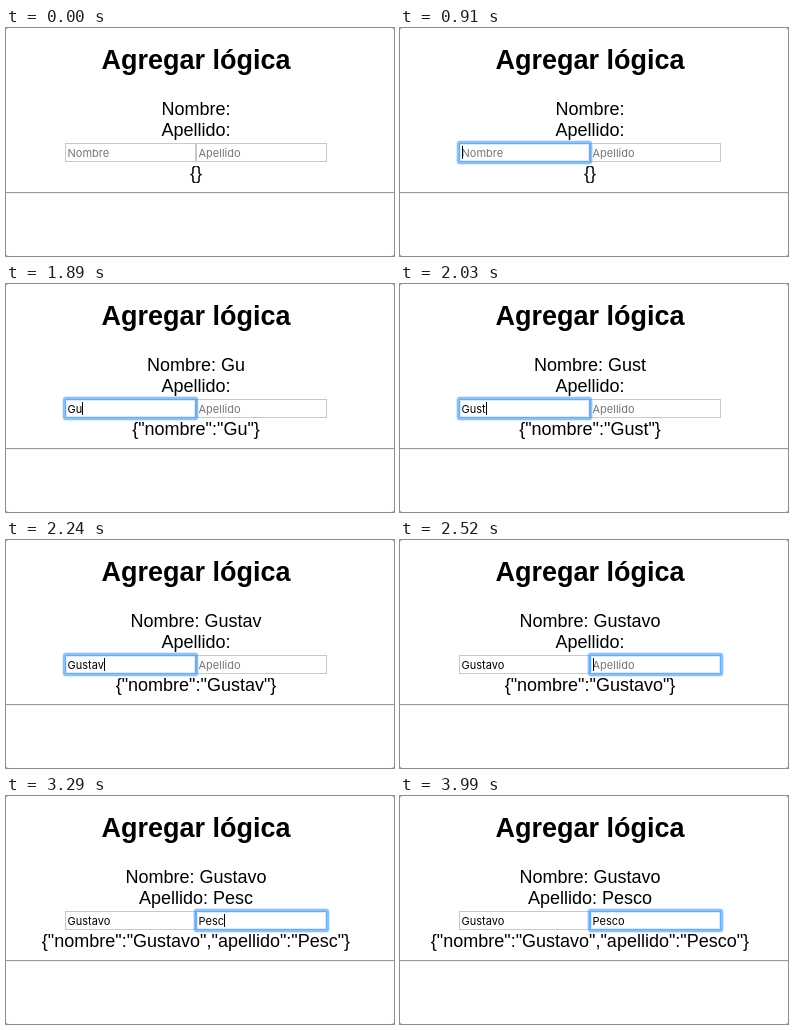
Animation of 388 by 228 pixels, one loop 4480 ms. Source, as an HTML page:

```html
<!DOCTYPE html>
<html lang="es">
<head>
<meta charset="utf-8">
<style>
  html, body { margin: 0; width: 100%; height: 100%; overflow: hidden; background: #aaa; }
  svg { display: block; width: 388px; height: 228px; background: #fff; border-radius: 3px; }
  text { font: 18px "Liberation Sans", Arial, sans-serif; text-anchor: middle; }
  .title { font-size: 27px; font-weight: bold; }
  .value { font: 11px Inter, Roboto, sans-serif; text-anchor: start; }
  .box { fill: none; stroke: #c8c8c8; }
  .ring { fill: none; stroke: #3b99fc; }
</style>
</head>
<body>
<svg viewBox="0 0 388 228">
  <text class="title" x="190" y="41">Agregar lógica</text>
  <text id="first" x="190" y="87"></text>
  <text id="last" x="190" y="108"></text>
  <text id="json" x="190" y="151"></text>
  <rect class="box" x="59.5" y="115.5" width="130" height="18"/>
  <rect class="box" x="190.5" y="115.5" width="130" height="18"/>
  <g id="focus">
    <rect class="ring" x="58.5" y="114.5" width="132" height="20" rx="2" stroke-width="5" opacity=".2"/>
    <rect class="ring" x="58.5" y="114.5" width="132" height="20" rx="1" stroke-width="3" opacity=".5"/>
  </g>
  <text class="value" id="field0" x="61.5" y="129"></text>
  <text class="value" id="field1" x="192.5" y="129"></text>
  <rect id="caret" y="118" width="1" height="13"/>
  <path d="M0 164.5H388" stroke="#9a9a9a"/>
  <path d="M0 165.5H388" stroke="#eee"/>
</svg>
<script>
  const LOOP = 4480, FOCUS = [910, 2520], CARET_OFF = 3990;
  const fields = [
    { key: 'nombre', label: 'Nombre', text: 'Gustavo', keys: [1540, 1890, 1960, 2030, 2100, 2240, 2380] },
    { key: 'apellido', label: 'Apellido', text: 'Pesco', keys: [2800, 3010, 3150, 3290, 3430] }
  ];
  const el = id => document.getElementById(id);

  function draw(t) {
    const data = {};
    fields.forEach((f, i) => {
      const typed = f.text.slice(0, f.keys.filter(k => k <= t).length);
      if (typed) data[f.key] = typed;
      el('field' + i).textContent = typed || f.label;
      el('field' + i).setAttribute('fill', typed ? '#000' : '#757575');
      el(i ? 'last' : 'first').textContent = `${f.label}: ${typed}`.trim();
    });
    el('json').textContent = JSON.stringify(data);

    const active = FOCUS.filter(s => s <= t).length - 1;
    el('focus').style.display = active < 0 ? 'none' : '';
    el('caret').style.display = active < 0 || t >= CARET_OFF ? 'none' : '';
    if (active < 0) return;
    el('focus').setAttribute('transform', `translate(${active * 131} 0)`);
    const typed = data[fields[active].key];
    const width = typed ? el('field' + active).getComputedTextLength() : 0;
    el('caret').setAttribute('x', Math.floor(62 + active * 131 + width));
  }

  const start = performance.now();
  function tick() {
    draw((performance.now() - start) % LOOP);
    requestAnimationFrame(tick);
  }
  tick();
</script>
</body>
</html>
```
